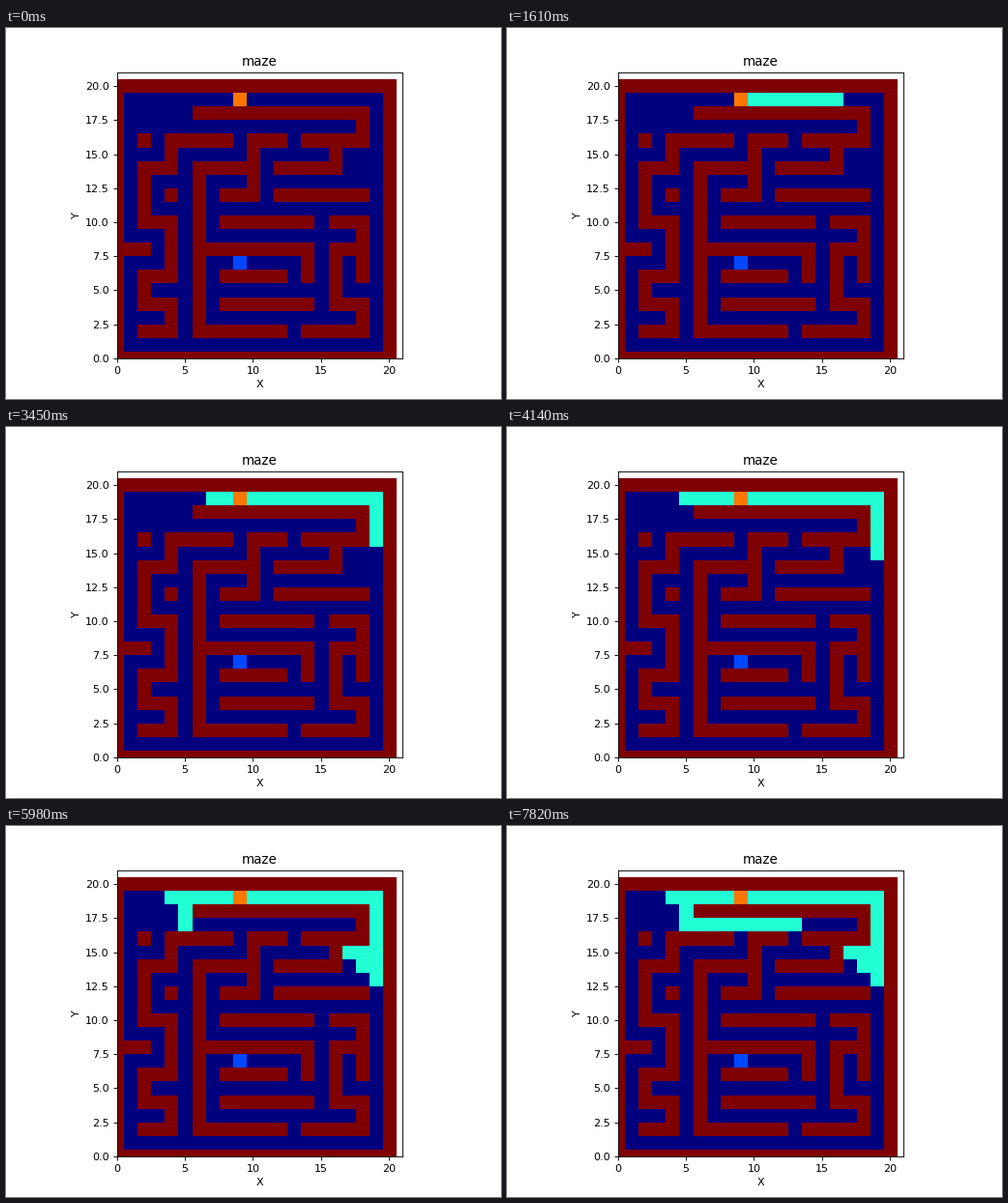
Recreate the animation shown at these times as a matplotlib script. Size 512x384 px, loop 8000 ms.

```python
from itertools import pairwise

import numpy as np
import matplotlib.pyplot as plt
from matplotlib.animation import FuncAnimation

SIZE = 21
LOOP_MS, TICK_MS, STEP_MS = 8000, 40, 230
START, GOAL = (9, 19), (9, 7)
WALL, ROUTE_START, VISITED, ROUTE_END = 255, 200, 100, 50


def build_maze():
    maze = np.zeros((SIZE, SIZE))

    def wall(*pillars):
        """Wall along a path of pillars, which stand on every second cell."""
        for (xa, ya), (xb, yb) in pairwise(pillars):
            xa, xb = sorted((xa, xb))
            ya, yb = sorted((ya, yb))
            maze[2 * ya:2 * yb + 1, 2 * xa:2 * xb + 1] = WALL

    def dot(x, y):
        wall((x, y), (x, y))

    wall((0, 0), (10, 0), (10, 10), (0, 10), (0, 0))

    # Left: a snake that changes side at every level
    side = 2
    for top, bottom in pairwise((8, 7, 5, 3, 2, 1)):
        wall((side, top), (side, bottom), (3 - side, bottom))
        side = 3 - side
    wall((2, 8), (4, 8))
    wall((0, 4), (1, 4))
    dot(1, 8)
    dot(2, 6)

    # Middle: a spine where every third bar is attached
    wall((3, 1), (3, 7))
    for row, end in enumerate((6, 7, 6, 7, 7, 5, 5), start=1):
        wall((3 if row % 3 == 1 else 4, row), (end, row))
    wall((6, 8), (5, 8), (5, 6))
    wall((7, 4), (7, 3))

    # Right: hooks above and below a long bar
    wall((3, 9), (9, 9), (9, 8), (7, 8))
    wall((8, 8), (8, 7), (6, 7))
    wall((6, 6), (9, 6))
    wall((8, 5), (9, 5), (9, 3))
    wall((9, 4), (8, 4), (8, 2), (9, 2), (9, 1), (7, 1))
    return maze


def search(maze, count):
    """Best-first search biased to the top right corner; returns visit order."""
    cost = {START: 0}
    frontier = {START}
    order = []

    def rank(cell):
        x, y = cell
        return cost[cell] + 2 * (SIZE - 2) - x - y, -x

    while len(order) <= count:
        cell = min(frontier, key=rank)
        frontier.remove(cell)
        order.append(cell)
        x, y = cell
        for near in ((x + 1, y), (x, y - 1), (x - 1, y), (x, y + 1)):
            if near not in cost and maze[near[1], near[0]] != WALL:
                cost[near] = cost[cell] + 1
                frontier.add(near)
    return order[1:]


maze = build_maze()
visits = search(maze, LOOP_MS // STEP_MS)
maze[START[1], START[0]] = ROUTE_START
maze[GOAL[1], GOAL[0]] = ROUTE_END

fig, ax = plt.subplots(figsize=(6.4, 4.8), dpi=80)
image = ax.imshow(maze, cmap="jet", vmin=0, vmax=WALL, origin="lower",
                  interpolation="nearest")
ax.set(xlim=(0, SIZE), ylim=(0, SIZE), xlabel="X", ylabel="Y")
ax.set_title("maze", fontsize=12.2)


def update(frame):
    # Steps falling between two ticks land on the earlier one.
    step = (frame * TICK_MS + 30) // STEP_MS
    grid = maze.copy()
    for x, y in visits[:step]:
        grid[y, x] = VISITED
    image.set_data(grid)
    return [image]


anim = FuncAnimation(fig, update, frames=LOOP_MS // TICK_MS,
                     interval=TICK_MS, repeat=True, repeat_delay=0)
plt.show()
```
